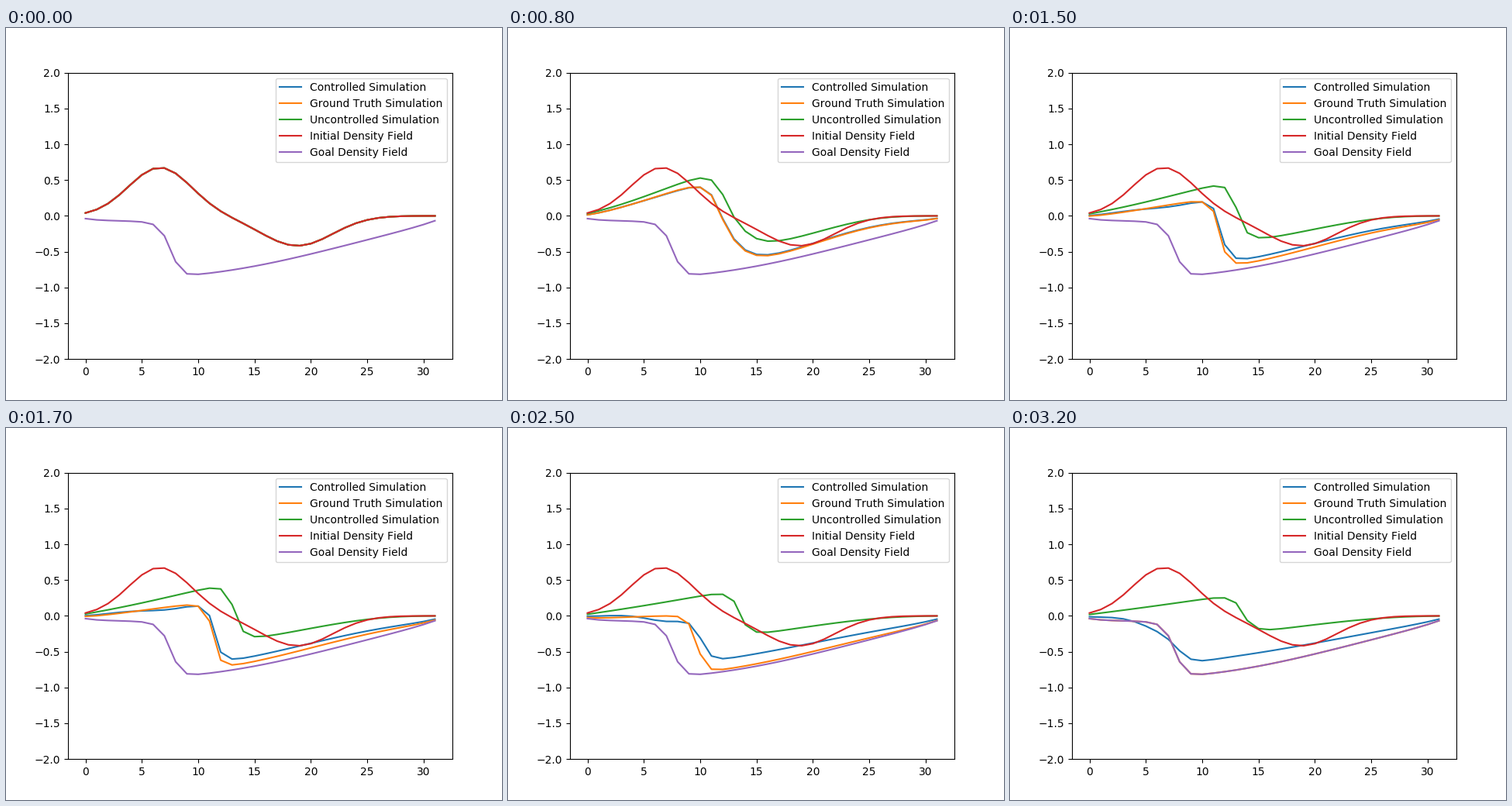
A matplotlib script that plays this animation: 640 by 480 pixels, repeating every 3.3 s.

```python
import numpy as np
import matplotlib.pyplot as plt
from matplotlib.animation import FuncAnimation

plt.rcParams["text.kerning_factor"] = 6

CELLS, STEPS = 32, 32
DIFFUSION = 0.096  # viscosity * dt / dx^2
x = np.arange(CELLS)


def gauss(amp, loc, sigma):
    return amp * np.exp(-0.5 * ((x - loc) / sigma) ** 2)


def burgers_step(u, force):
    """Explicit diffusion, semi-Lagrangian advection, then forcing."""
    p = np.pad(u, 1)
    u = u + DIFFUSION * (p[2:] - 2 * u + p[:-2])
    u = np.interp(x - u, np.arange(-1, CELLS + 1), np.pad(u, 1))
    return u + force


def simulate(u, force):
    """All states of a run; force maps a step number to a field."""
    states = [u]
    for k in range(STEPS):
        states.append(burgers_step(states[-1], force(k)))
    return states


initial = gauss(0.675, 6.6, 2.78) + gauss(-0.418, 18.8, 3.1)
push = gauss(-0.0264, 16.7, 8.4)
late_push = 0.47 * push + gauss(-0.016, 7.5, 2.0)


def control(k):
    """Starts like the true force, then eases into a narrower push."""
    fade = np.exp(-(k / 12) ** 2)
    return fade * push + (1 - fade) * late_push


truth = simulate(initial, lambda k: push)
free = simulate(initial, lambda k: 0.0)
controlled = simulate(initial, control)

series = [
    ("Controlled Simulation", controlled),
    ("Ground Truth Simulation", truth),
    ("Uncontrolled Simulation", free),
    ("Initial Density Field", [initial] * (STEPS + 1)),
    ("Goal Density Field", [truth[-1]] * (STEPS + 1)),
]

fig, ax = plt.subplots(figsize=(6.4, 4.8), dpi=100)
lines = [ax.plot(x, states[0], label=label)[0] for label, states in series]
ax.set_xlim(-1.55, 32.55)
ax.set_ylim(-2, 2)
ax.legend(loc="upper right")


def update(i):
    for line, (_, states) in zip(lines, series):
        line.set_ydata(states[i])
    return lines


anim = FuncAnimation(fig, update, frames=STEPS + 1, interval=100,
                     repeat=True, repeat_delay=0)
plt.show()
```
